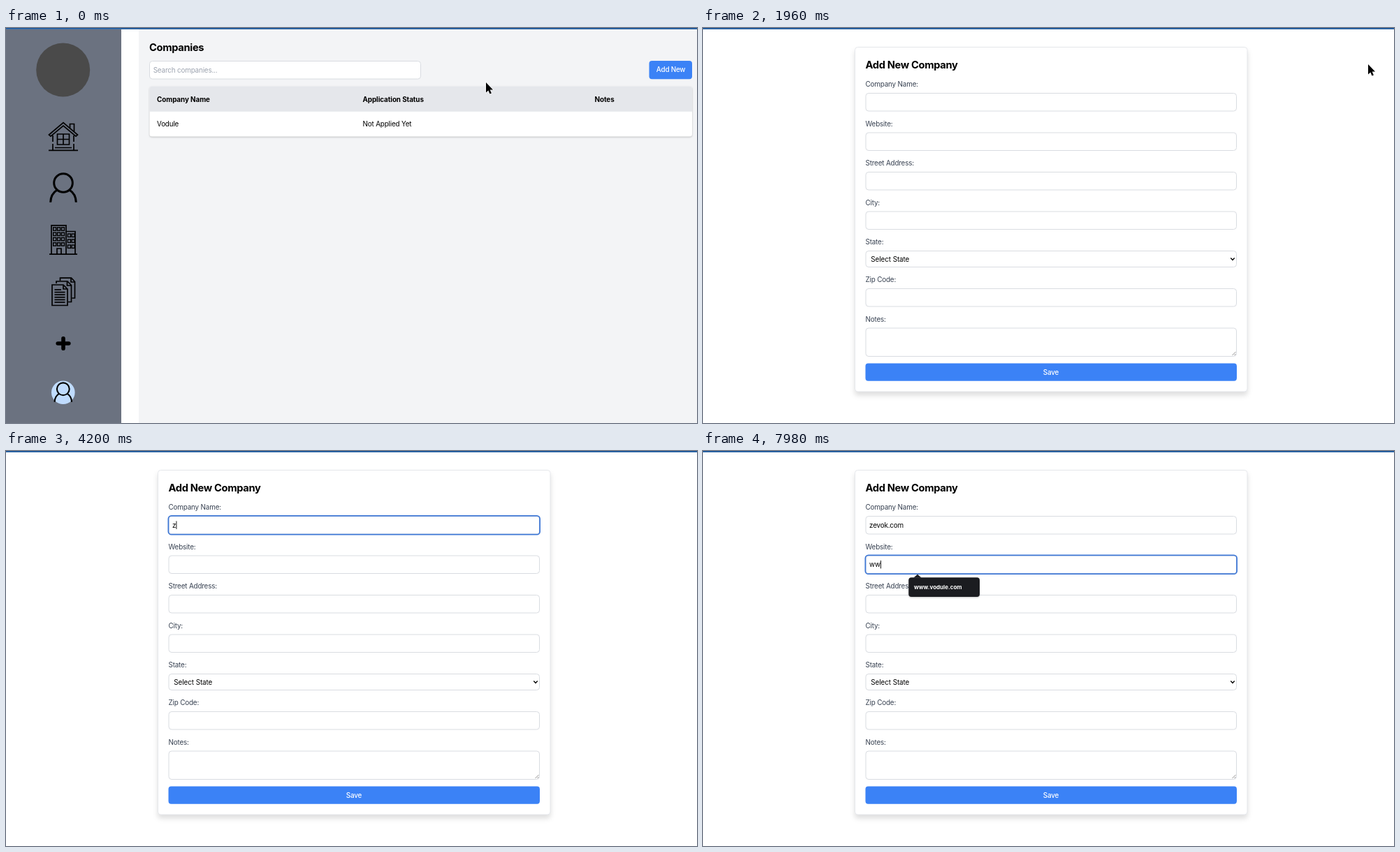
These frames come from a looping animation (989 px wide and 566 px high, 8 s). An HTML page:

```html
<!DOCTYPE html>
<html lang="en">
<head>
<meta charset="utf-8">
<title>Companies</title>
<style>
html, body { margin: 0; width: 100%; height: 100%; overflow: hidden; background: #fff; }
svg { display: block; width: 989px; height: 566px; }
text { font: 400 9.9px Inter, "Open Sans", sans-serif; letter-spacing: -.18px; white-space: pre; }
.bold { font-weight: 700; letter-spacing: -.08px; }
.title { font-weight: 700; font-size: 14.7px; letter-spacing: -.35px; }
.btn { font-weight: 500; letter-spacing: -.22px; fill: #fff; }
.label { fill: #374151; }
.hint { fill: #9ca3af; }
.option { letter-spacing: -.08px; }
.tip { font-weight: 700; font-size: 8px; letter-spacing: 0; fill: #fff; }
.field { fill: #fff; stroke: #d9dce1; }
.icon { fill: none; stroke: #000; stroke-width: 1.7; }
.shadow { filter: drop-shadow(0 1px 1.2px rgba(0,0,0,.22)); }
.lift { filter: drop-shadow(0 5px 3.5px rgba(0,0,0,.13)); }
</style>
</head>
<body>
<svg id="stage" viewBox="0 0 989 566" xmlns="http://www.w3.org/2000/svg"></svg>
<script>
const LOOP = 8000, STEP = 70;
const stage = document.getElementById('stage');

const rect = (x, y, w, h, attrs = '', r = 0) =>
  `<rect x="${x}" y="${y}" width="${w}" height="${h}" rx="${r}" ${attrs}/>`;
const text = (x, y, s, cls = '', id = '') =>
  `<text x="${x}" y="${y}" class="${cls}" ${id && `id="${id}"`}>${s}</text>`;
const path = (d, attrs = 'class="icon"') => `<path d="${d}" ${attrs}/>`;
const field = (x, y, w, h) => rect(x + .5, y + .5, w - 1, h - 1, 'class="field"', 4);

function house() {
  return path('M61.5 153 82 135.5 102.5 153 100 155.2 82 140 64 155.2Z') +
    path('M91.5 143V137.5H97.5V148M67 154V163M67 166V175M97 154V163M97 166V175M61 175.3H103M70 171.5H94') +
    path('M73.5 152H90.5V167H73.5ZM82 152V167M73.5 159.5H90.5');
}

function person(cx, cy, k, width) {
  return `<g transform="translate(${cx} ${cy}) scale(${k})" class="icon" style="stroke-width:${width}">
    <circle cy="-7" r="13.3"/><path d="M-18.3 20.7C-18 12-14.5 6.5-9 3.2M18.3 20.7C18 12 14.5 6.5 9 3.2"/></g>`;
}

function building() {
  let s = path('M65 324V282.8H86V324M86 291.5H99V324M62 324.2H102M73 324V316H79V324');
  const pane = (x, y) => rect(x, y, 4, 4.4, 'class="icon" style="stroke-width:1.4"');
  for (let row = 0; row < 4; row++) {
    for (let col = 0; col < 3; col++) s += pane(67.7 + col * 5.9, 285.8 + row * 7.3);
    if (row < 3) for (let col = 0; col < 2; col++) s += pane(88.4 + col * 5.7, 295 + row * 8);
  }
  return s;
}

function documents() {
  let s = path('M72 366V363H88L93.5 368.5V392.5H89M77.5 362V358.2H93.5L98.5 363.5V387H94.5M93 358.5V364H98.5M87.5 363V369H93') +
    path('M66 368H82L88 374V397.5H66ZM82 368V374H88');
  for (let i = 0; i < 6; i++) s += path(`M69.5 ${375 + i * 3.6}H${i ? 84.5 : 79}`);
  return s;
}

function listPage() {
  return rect(0, 2, 165, 564, 'fill="#6b7280"') +
    rect(190, 2, 799, 564, 'fill="#f3f4f6"') +
    '<circle cx="81.7" cy="60" r="38.5" fill="#4a4a4a"/>' +
    house() + person(82, 229, 1, 3) + building() + documents() +
    path('M82 444.7V459.3M74.2 452H89.8', 'stroke="#000" stroke-width="5.6" stroke-linecap="round"') +
    '<circle cx="81.8" cy="522.3" r="16.8" fill="#bfdbfe"/>' + person(81.8, 522, .67, 3.1) +
    text(205, 33, 'Companies', 'title') +
    field(205, 47, 389, 26.5) + text(210.7, 64, 'Search companies...', 'hint') +
    rect(920.5, 47, 61.5, 26.3, 'fill="#3b82f6"', 4) + text(930.8, 63.4, 'Add New', 'btn') +
    '<g class="shadow">' + rect(205.5, 83.5, 776.5, 72, 'fill="#fff"', 3.5) + '</g>' +
    path('M205.5 119.8V87Q205.5 83.5 209 83.5H978.5Q982 83.5 982 87V119.8Z', 'fill="#e5e7eb"') +
    text(216, 105.5, 'Company Name', 'bold') +
    text(510.5, 105.5, 'Application Status', 'bold') +
    text(842.5, 105.5, 'Notes', 'bold') +
    text(216, 141.2, 'Vodule') + text(510.5, 141.2, 'Not Applied Yet');
}

function formPage() {
  const rows = [
    ['Company Name:', 84, 93, 26.5], ['Website:', 140.6, 149.5, 26.5],
    ['Street Address:', 197.1, 206, 26.5], ['City:', 253.6, 262.5, 26.5],
    ['State:', 310.1, 319, 24], ['Zip Code:', 364, 373, 26.5], ['Notes:', 420.5, 429.5, 41.5]
  ];
  return '<g class="lift">' +
    rect(217.5, 27.5, 561.5, 493.5, 'fill="#fff" stroke="#e5e7eb"', 4) + '</g>' +
    text(232.5, 58.4, 'Add New Company', 'title') +
    rows.map(([name, base, y, h]) =>
      text(232.5, base, name, 'label') + field(232.5, y, 531.5, h)).join('') +
    text(240.3, 334.5, 'Select State', 'option') +
    path('M755.3 329.6 758 332.4 760.7 329.6', 'fill="none" stroke="#000" stroke-width="1.4"') +
    path('M757.5 469 762.5 464M760.5 469 762.5 467', 'stroke="#666" stroke-width=".7"') +
    rect(232.5, 480.5, 531.5, 25.3, 'fill="#3b82f6"', 4) + text(486.8, 497, 'Save', 'btn') +
    rect(232.4, 92.9, 531.7, 26.8, 'id="ring" fill="none" stroke="#3f78d6" stroke-width="1.8"', 4.3) +
    text(238, 109.7, '', '', 'name') + text(238, 166.2, '', '', 'site') +
    rect(0, 0, .9, 11.5, 'id="caret"') +
    popup('nameTip', 125, ['Vodule', 'Kelbrin', 'Ostavo']) +
    popup('siteTip', 181.3, ['www.vodule.com']);
}

function popup(id, y, items) {
  const h = 27.7 + 18.5 * (items.length - 1);
  return `<g id="${id}" class="shadow">` + rect(294.3, y, 101.7, h, 'fill="#1b1c20"', 4) +
    path(`M301.5 ${y + .3} 307 ${y - 4.5} 312.5 ${y + .3}Z`, 'fill="#1b1c20"') +
    items.map((s, i) => text(302, y + 17 + 18.5 * i, s, 'tip')).join('') + '</g>';
}

const pointers = '<circle id="press" r="15.5" fill="none" stroke="#000" stroke-width="2"/>' +
  path('M0 0V14.4L3.3 11.4 5.5 16.6 7.9 15.6 5.7 10.5H10Z',
    'id="arrow" stroke="#fff" stroke-width="1.2" paint-order="stroke"') +
  path('M-2.6-7.4Q0-7.4 0-5.6V5.6Q0 7.4-2.6 7.4M2.6-7.4Q0-7.4 0-5.6V5.6Q0 7.4 2.6 7.4M-1.6 1.8H1.6',
    'id="beam" fill="none" stroke="#000" stroke-width="1.1"') +
  path('M3.4 10.5 2 4.2Q1.8 2.7 3 2.5T4.8 3.6L6 7.5Q7.4 6.2 8.4 7.5 9.8 6.5 10.7 8 12.3 7.4 12.7 9.2L13 13Q12.9 15.2 11.8 16.5V18H5.8V16.8Q3.6 15 2.2 12.3 1 10.4 1.8 9.8T3.4 10.5ZM6.6 11.5V14.5M8.5 11.5V14.5M10.4 11.5V14.5',
    'id="hand" fill="#fff" stroke="#000" stroke-width="1"');

stage.innerHTML = `<g id="list">${listPage()}</g><g id="form">${formPage()}</g>` +
  rect(0, 0, 989, 1.8, 'fill="#17549a"') + pointers;

const el = {};
stage.querySelectorAll('[id]').forEach(n => el[n.id] = n);
const show = (id, on) => el[id].style.display = on ? '' : 'none';
const within = (t, ...spans) => spans.some(([a, b]) => t >= a && t < b);

// Each move: start, end, from, control point, to
const moves = [
  [0, 630, [687, 78], [610, 74], [523, 65]],
  [770, 840, [523, 65], [523, 64], [523, 64]],
  [980, 1680, [523, 64], [735, 106], [952, 52]],
  [2170, 2800, [952, 52], [765, 78], [591, 100]],
  [2800, 2940, [591, 100], [589, 101], [587, 102]],
  [3500, 3570, [587, 102], [590, 106], [590, 106]]
];

function pointerAt(t) {
  const [a, b, p, c, q] = moves.filter(m => t >= m[0]).pop();
  const k = Math.min(1, (t - a) / (b - a)), u = k * k * (3 - 2 * k), v = 1 - u;
  return p.map((n, i) => v * v * n + 2 * u * v * c[i] + u * u * q[i]);
}

const nameKeys = [4200, 4270, 4410, 4620, 4970, 5600, 5810, 5880, 5880];
const siteKeys = [7840, 7980];
const typed = (s, keys, t) => s.slice(0, keys.filter(k => t >= k).length);

function draw(time) {
  const t = Math.floor(time / STEP) * STEP;
  const onForm = t >= 1960, onSite = t >= 6090;
  show('list', !onForm);
  show('form', onForm);

  const [x, y] = pointerAt(t);
  const inField = onForm ? x < 764 && y > 93 : x < 593 && y > 47 && y < 73;
  const onButton = !onForm && x > 920 && y < 73;
  const kind = t >= 4200 ? '' : inField ? 'beam' : onButton ? 'hand' : 'arrow';
  for (const id of ['arrow', 'beam', 'hand']) {
    show(id, id === kind);
    el[id].setAttribute('transform', `translate(${x} ${y})`);
  }
  show('press', within(t, [1820, 1890], [3010, 3220]));
  el.press.setAttribute('transform', onForm ? `translate(${x - 2.2} ${y - 3.5})` : `translate(${x + 3} ${y + 3})`);

  if (!onForm) return;
  el.name.textContent = typed('zevok.com', nameKeys, t);
  el.site.textContent = typed('www', siteKeys, t);
  show('ring', t >= 3150);
  el.ring.setAttribute('y', onSite ? 149.4 : 92.9);
  show('caret', within(t, [3150, 3710], [4200, 5460], [5600, 6580], [7140, 7630], [7840, LOOP]));
  const line = onSite ? el.site : el.name;
  const width = line.textContent ? line.getComputedTextLength() : 0;
  el.caret.setAttribute('x', 238.2 + width);
  el.caret.setAttribute('y', onSite ? 156.9 : 100.4);
  show('nameTip', within(t, [3220, 4200]));
  show('siteTip', t >= 7840);
}

function frame() {
  draw(performance.now() % LOOP);
  requestAnimationFrame(frame);
}
frame();
</script>
</body>
</html>
```
